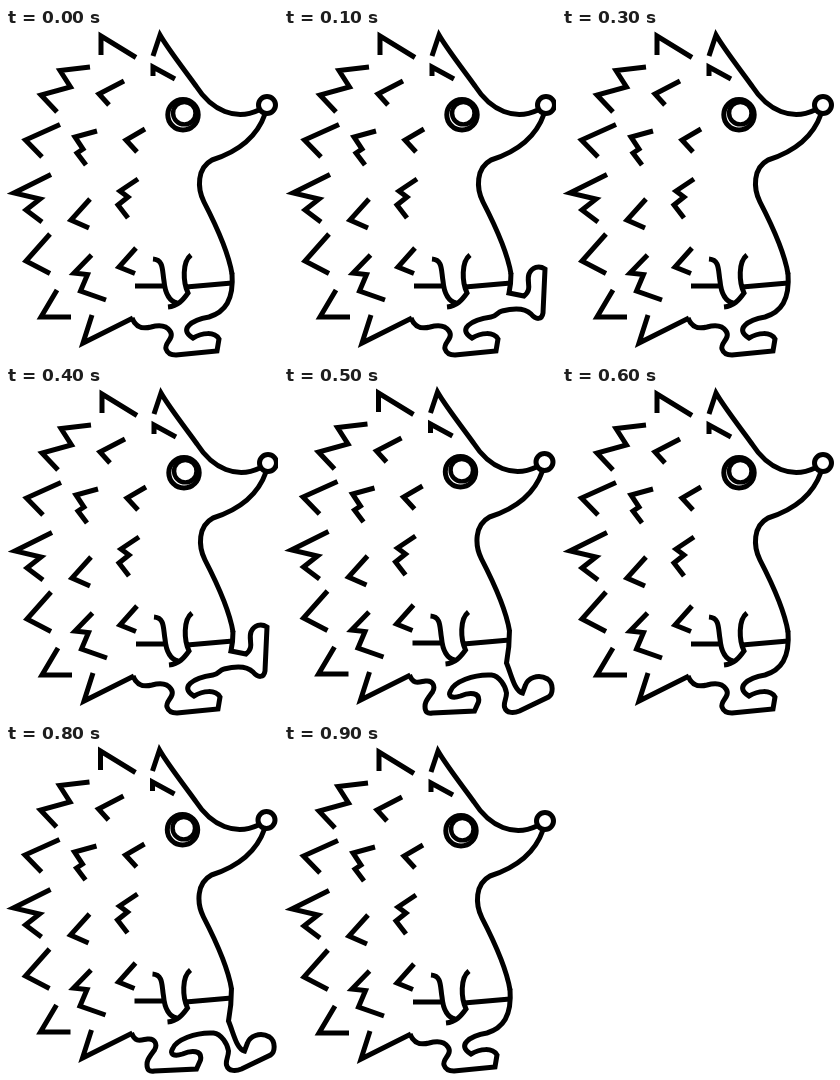
Write an HTML page that moves like this. It is 272 px wide and 330 px high and loops after 1 s.

```html
<!DOCTYPE html>
<html lang="en">
<head>
<meta charset="utf-8">
<title>Walking hedgehog</title>
<style>
  html, body { margin: 0; width: 100%; height: 100%; overflow: hidden; background: #fff; }
  svg { display: block; width: 272px; height: 330px; }
  path, circle { fill: none; stroke: #000; stroke-width: 5; stroke-miterlimit: 10; }
</style>
</head>
<body>
<svg viewBox="0 0 272 330">
  <g id="hedgehog">
    <!-- spikes -->
    <path d="M95 27V8L130 29.5 M84 39L54 42.5 64.5 59 35 67 51 84 M118 53L93 66 103 77
      M54 96.5L19.5 112 36 129 M91 103L69 109 77 121 71 125 80 137 M139 101L120 112 131 124
      M45 146.5L8 165 34 171 20 182 36 194 M132 151L114 163 122 169 112 177 122 190
      M84 171L65 192 83 200 M44 206L20 233 44 245.5 M130 220L113 239 129 245.5
      M85.5 227L68 245 81.5 246.5 74.5 263 100 272 M51 262L35 289H65 M86 287L77 315 127 290"/>
    <!-- ear, face and belly -->
    <path d="M147 28L154 7C162 21 180 44 190 58C206 83 230 93 253 82
      M147 48V39L169 51
      M259 86C250 112 228 125 206 132C191 140 191 160 198 174C214 205 223 227 226 246"/>
    <circle cx="261" cy="77" r="8.5"/>
    <circle cx="177" cy="86.8" r="15.2"/>
    <circle cx="178.3" cy="85.2" r="11.2" style="stroke-width:4.4"/>
    <!-- arms and waist -->
    <path d="M147 231C158 232 156 242 158 253C159 264 163 273 171 275
      M185 227C176 234 177 254 182 265C177 272 172 278 162 279
      M129 258H158 M180 259L226 255"/>
    <path id="legs"/>
  </g>
</svg>
<script>
const hedgehog = document.getElementById('hedgehog');
const legs = document.getElementById('legs');
const backFoot = 'M126 290C130 300 137 301 145 299C152 297 160 297 164 303C169 310 158 315 160 321Q162 327 170 327L211 323 213 311C208 303 196 305 187 310';

const poses = [
  { // standing
    shift: [0, 0],
    legs: backFoot + 'C172 301 186 292 203 289C219 284 228 272 226 245'
  },
  { // front leg raised
    shift: [1, 0],
    legs: backFoot + 'C172 301 186 292 206 289C212 288 212 284 217 283C229 280 240 280 246 286C251 292 257 292 258 285L260 241C254 237 247 239 244 246C241 254 248 261 239 268L224 265Q226 256 226 245'
  },
  { // stepping forward
    shift: [-.5, -1],
    legs: 'M126 290C130 300 135 297 142 296C150 295 152 302 149 307C144 314 140 318 142 325Q143 329 149 328L191 326 195 317C197 307 186 307 177 311C168 314 164 311 167 306C170 297 190 289 208 290C216 291 222 301 223 308C223 314 220 317 221 322C223 329 231 328 236 326L265 312C270 309 270 298 264 294C254 288 244 294 242 300L239 308C231 306 228 290 223 278Q226 262 226 245'
  }
];

let shown = -1;
function draw(now) {
  const next = Math.floor(now % 1000 / 100) % poses.length;
  if (next !== shown) {
    shown = next;
    const pose = poses[next];
    hedgehog.setAttribute('transform', `translate(${pose.shift})`);
    legs.setAttribute('d', pose.legs);
  }
  requestAnimationFrame(draw);
}
draw(0);
</script>
</body>
</html>
```
